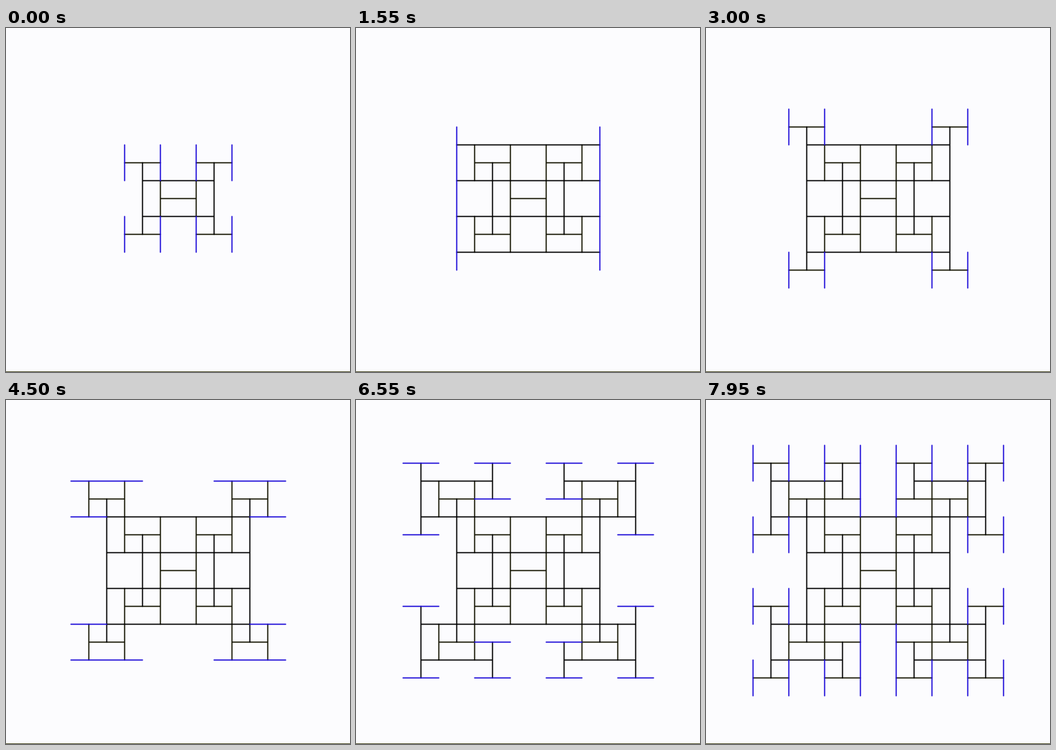
Animation, 596 px wide and 596 px high, one loop 8 s. Source, as an HTML page with a canvas:

```html
<!DOCTYPE html>
<html lang="en">
<head>
<meta charset="utf-8">
<title>Toothpick sequence</title>
<style>
  html, body { margin: 0; width: 100%; height: 100%; overflow: hidden; background: #fcfcfe; }
  canvas { display: block; }
</style>
</head>
<body>
<canvas id="stage" width="596" height="596"></canvas>
<script>
const ctx = document.getElementById('stage').getContext('2d');
const LOOP = 8000, STEP = 1000, FIRST_CHANGE = 50;
const HALF = 31, CENTER_X = 298.5, CENTER_Y = 295.5;
const FIRST_GENERATION = 5, LAST_GENERATION = 13;
const COLORS = { paper: '#fcfcfe', fresh: '#1a08d8', old: '#000', tinted: '#141400', floor: '#333308' };

// Grid units are half a toothpick; orientation alternates each generation.
const endsOf = ({ x, y, flat }) =>
  flat ? [[x - 1, y], [x + 1, y]] : [[x, y - 1], [x, y + 1]];

function growGenerations(last) {
  const touches = new Map();
  const mark = point => touches.set(String(point), (touches.get(String(point)) || 0) + 1);
  const generations = [[{ x: 0, y: 0, flat: true }]];
  for (let g = 0; g <= last; g++) {
    const picks = generations[g];
    for (const pick of picks) {
      mark([pick.x, pick.y]);
      endsOf(pick).forEach(mark);
    }
    generations.push(picks.flatMap(pick => endsOf(pick)
      .filter(point => touches.get(String(point)) === 1)
      .map(([x, y]) => ({ x, y, flat: !pick.flat }))));
  }
  return generations;
}

const generations = growGenerations(LAST_GENERATION);

function addPick(path, pick) {
  const [a, b] = endsOf(pick);
  path.moveTo(CENTER_X + a[0] * HALF, CENTER_Y + a[1] * HALF);
  path.lineTo(CENTER_X + b[0] * HALF, CENTER_Y + b[1] * HALF);
}

// One path per colour keeps the soft edges of overlapping picks even.
function strokePicks(picks, color) {
  const path = new Path2D();
  picks.forEach(pick => addPick(path, pick));
  ctx.strokeStyle = color;
  ctx.stroke(path);
}

const isTinted = ({ x, y, flat }) => flat ? y % 2 === 0 : x % 2 !== 0;

function draw(newest) {
  ctx.fillStyle = COLORS.paper;
  ctx.fillRect(0, 0, 596, 596);
  ctx.fillStyle = COLORS.floor;
  ctx.fillRect(0, 595, 596, 1);
  ctx.lineWidth = 2;
  ctx.lineCap = 'round';
  const old = generations.slice(0, newest).flat();
  strokePicks(old.filter(isTinted), COLORS.tinted);
  strokePicks(old.filter(pick => !isTinted(pick)), COLORS.old);
  strokePicks(generations[newest], COLORS.fresh);
}

const start = performance.now();
let shown = -1;

function tick(now) {
  const t = Math.max(0, now - start) % LOOP;
  const newest = FIRST_GENERATION + (t < FIRST_CHANGE ? 0 : 1 + Math.floor(t / STEP));
  if (newest !== shown) draw(shown = newest);
  requestAnimationFrame(tick);
}
tick(start);
</script>
</body>
</html>
```
